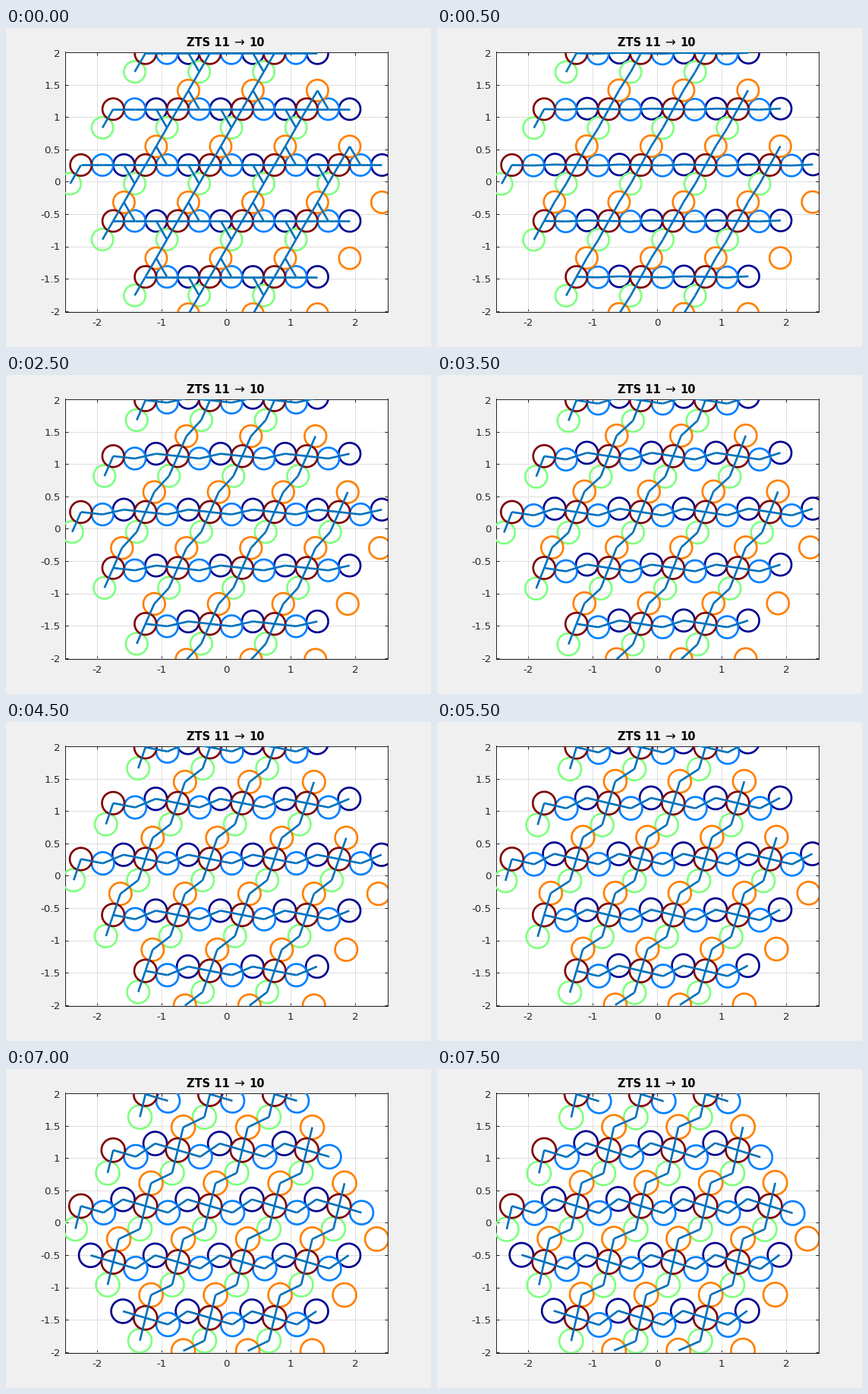
Recreate the animation shown at these times as a matplotlib script. Size 560 by 420 pixels, loop 8 s.

```python
import numpy as np
import matplotlib.pyplot as plt
from matplotlib.animation import FuncAnimation
from matplotlib.collections import LineCollection

W, H, DPI = 560, 420, 100
PX = 72 / DPI          # points per pixel
SCALE = 85             # pixels per data unit
LEFT, RIGHT, TOP, BOTTOM = 77.5, 502.5, 31.5, 373.5
FRAMES, STEP_MS = 16, 500
STEP = np.radians(1.28)  # linkage turn per step
WRAP = 12                # step at which one site wraps to the next cell row
INK = "#262626"

plt.rcParams.update({
    "font.family": "DejaVu Sans",
    "font.size": 13.33 * PX,
    "axes.unicode_minus": False,
})

# Lattice: hexagonal patch of 19 cells, five sites in each
A1 = np.array([1, 0])
A2 = np.array([0.5, np.sqrt(3) / 2])
ORIGIN = np.array([-0.25, 0.3 * np.sqrt(3) / 2])
CELLS = np.array([i * A1 + j * A2
                  for j in range(-2, 3) for i in range(-2, 3)
                  if abs(i + j) <= 2]) + ORIGIN
COLORS = ["#00008f", "#0080ff", "#80ff80", "#ff8000", "#800000"]

turn = np.linspace(0, 2 * np.pi, 73)
CIRCLE = np.column_stack([np.cos(turn), np.sin(turn)])


def sites(k):
    """Site centres and bond length at step k."""
    phi = k * STEP
    c, h = (2 - np.cos(phi)) / 3, np.sin(phi) / 3
    arm = np.array([c, -h])
    up = c * A2 + h * np.array([-A2[1], A2[0]])
    back = A1 - arm - (A2 if k >= WRAP else 0)
    basis = [back, arm, -up, up + A1 - A2, np.zeros(2)]
    return np.concatenate([CELLS + b for b in basis]), np.hypot(c, h)


def bonds(points, length):
    gap = np.linalg.norm(points[:, None] - points[None], axis=2)
    a, b = np.where(np.triu(np.abs(gap - length) < 1e-4))
    return np.stack([points[a], points[b]], axis=1)


fig = plt.figure(figsize=(W / DPI, H / DPI), dpi=DPI, facecolor="#f0f0f0")
ax = fig.add_axes([LEFT / W, 1 - BOTTOM / H,
                   (RIGHT - LEFT) / W, (BOTTOM - TOP) / H])
half_w, half_h = (RIGHT - LEFT) / 2 / SCALE, (BOTTOM - TOP) / 2 / SCALE
ax.set_xlim(-half_w, half_w)
ax.set_ylim(-half_h, half_h)
ax.set_axisbelow(True)

ax.set_xticks(range(-2, 3))
ax.set_yticks(np.arange(-2, 2.1, 0.5))
ax.yaxis.set_major_formatter(lambda v, _: f"{v:g}")
ax.tick_params(direction="in", top=True, right=True, length=4.25 * PX,
               width=PX, color=INK, labelcolor=INK)
ax.tick_params(axis="x", pad=8 * PX)
ax.tick_params(axis="y", pad=6 * PX)
ax.grid(color="#dfdfdf", linewidth=PX)
for spine in ax.spines.values():
    spine.set(color=INK, linewidth=PX)


def title_part(x, text, size, weight):
    fig.text(x / W, 1 - 24.3 / H, text, fontsize=size * PX, weight=weight,
             ha="center", va="baseline", color="black")


title_part(266, "ZTS 11", 14.67, "bold")
title_part(307, "\u2192", 16.5, "normal")
title_part(331, "10", 14.67, "bold")

rings = LineCollection([], colors=np.repeat(COLORS, len(CELLS)),
                       linewidths=2.67 * PX, zorder=3)
links = LineCollection([], colors="#0072bd", linewidths=2.67 * PX, zorder=4)
ax.add_collection(rings, autolim=False)
ax.add_collection(links, autolim=False)


def draw(k):
    points, length = sites(k)
    rings.set_segments(points[:, None] + CIRCLE * length / 2)
    links.set_segments(bonds(points, length))
    return rings, links


anim = FuncAnimation(fig, draw, frames=FRAMES, interval=STEP_MS,
                     repeat=True, repeat_delay=0)
plt.show()
```
